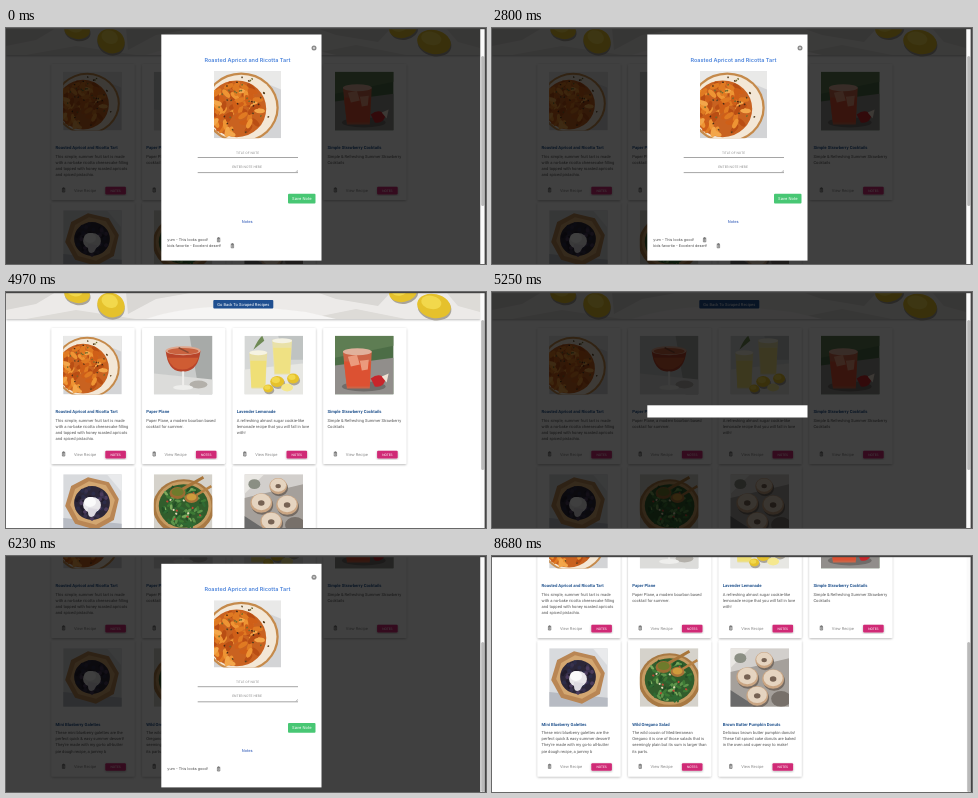
An HTML page that plays this animation: 480 by 236 pixels, repeating every 8750 ms.

```html
<!DOCTYPE html>
<html lang="en">
<head>
<meta charset="utf-8">
<title>Saved recipes</title>
<style>
  html, body { margin: 0; width: 100%; height: 100%; overflow: hidden; background: #fff; }
  #stage { display: block; width: 480px; height: 236px; }
  text { font-family: Roboto, sans-serif; text-rendering: geometricPrecision; }
  #modal text { font-family: Inter, sans-serif; }
</style>
</head>
<body>
<svg id="stage" viewBox="0 0 480 236"></svg>
<script>
const LOOP = 8750, SCROLL = 90;
const stage = document.getElementById('stage');

let seed = 11;
const rnd = () => (seed = seed * 16807 % 2147483647) / 2147483647;
const pick = list => list[Math.floor(rnd() * list.length)];
const repeat = (n, make) => Array.from({ length: n }, (_, i) => make(i)).join('');

const rect = (x, y, w, h, fill, more = '') =>
  `<rect x="${x}" y="${y}" width="${w}" height="${h}" fill="${fill}" ${more}/>`;
const oval = (x, y, rx, ry, fill, more = '') =>
  `<ellipse cx="${x}" cy="${y}" rx="${rx}" ry="${ry}" fill="${fill}" ${more}/>`;
const path = (d, fill, more = '') => `<path d="${d}" fill="${fill}" ${more}/>`;
const line = (d, color, width) => path(d, 'none', `stroke="${color}" stroke-width="${width}"`);
const label = (x, y, size, fill, str, more = '') =>
  `<text x="${x}" y="${y}" font-size="${size}" fill="${fill}" ${more}>${str.replace(/&/g, '&amp;')}</text>`;
const mid = 'text-anchor="middle"';
const turn = (a, x, y) => `transform="rotate(${a} ${x} ${y})"`;
const trash = (x, y, color) =>
  path(`M${x - 1.6} ${y - 1.7}h3.2M${x - .6} ${y - 2.2}h1.2M${x - 1.2} ${y - 1.2}v3.2h2.4v-3.2zM${x} ${y - .8}v2.4`,
    'none', `stroke="${color}" stroke-width=".65"`);

// Scatter small ovals inside a disc
const scatter = (n, cx, cy, r, rx, ry, colors) => repeat(n, () => {
  const a = rnd() * 6.283, d = Math.sqrt(rnd()) * r;
  const x = cx + Math.cos(a) * d, y = cy + Math.sin(a) * d;
  return oval(x, y, rx, ry, pick(colors), turn(rnd() * 180, x, y));
});
const lemon = (x, y, rx, ry, a = 0) =>
  oval(x + 1, y + 2, rx, ry, '#a9a49a', turn(a, x, y)) +
  oval(x, y, rx, ry, '#e5c12c', turn(a, x, y)) +
  oval(x - rx * .2, y - ry * .25, rx * .6, ry * .55, '#f2d84c', turn(a, x, y));
const donut = (x, y, r) =>
  oval(x + 1, y + 2, r, r * .9, '#756b63') + oval(x, y, r, r * .9, '#c9a583') +
  oval(x, y - 1, r * .88, r * .75, '#e5d4c0') + oval(x, y, r * .3, r * .25, '#766253');

const art = [
  // tart
  rect(0, 0, 59, 59, '#d3d4d6') + path('M0 0H59V16L30 4L0 12Z', '#e9e9e8') +
  oval(24, 32, 33, 31, '#c58a4b') + oval(24, 32, 31, 29, '#f3e7d6') + oval(20, 33, 26, 25, '#c96220') +
  scatter(75, 20, 33, 23, 4.6, 2.1, ['#e07a22', '#ee9433', '#cf5f18', '#f3a64a', '#b94e14']) +
  scatter(34, 27, 30, 25, .9, .7, ['#59401f', '#6f6a2c', '#4a2a14']),
  // coupe cocktail
  rect(0, 0, 59, 59, '#c9cbca') + path('M36 0H59V59H46Z', '#a7aaa8') + path('M0 38L59 44V59H0Z', '#dcdcda') +
  oval(45, 49, 9, 4, '#b3b0aa') +
  path('M12 15Q14 35 27 36H32Q45 34 47 15Z', '#b8442a') + path('M14 22Q18 34 29 34Q41 33 45 22Z', '#cf5c33') +
  oval(29.5, 15, 17.5, 4.5, '#dfa78e') + oval(29.5, 15.5, 15.5, 3.2, '#c9623f') +
  line('M29.5 36V51', '#efeeec', 2) + oval(29.5, 52, 10, 2.5, '#eeeeec') + line('M25 12L35 17', '#8a4b33', 1.5),
  // lemonade
  rect(0, 0, 59, 59, '#d5d7d6') + path('M0 34L59 28V59H0Z', '#e7e7e3') + path('M34 0H59V24H40Z', '#bfc3c2') +
  path('M28 4H48L46 39H30Z', '#e9e1a8') + path('M29 12H47L46 38H31Z', '#efe183') + oval(38, 5, 10, 2.5, '#f4f2e4') +
  path('M5 17H23L21 53H7Z', '#e8dfa4') + path('M6 25H22L21 52H7Z', '#efdf76') + oval(14, 17, 9, 2.5, '#f6f3e2') +
  lemon(33, 46, 7, 5.5) + lemon(49, 43, 6, 5) + lemon(24, 53, 5, 4) + oval(43, 52, 6, 4, '#f5e88f') +
  path('M9 14Q14 3 18 0L20 5Z', '#6f8a55'),
  // strawberry cocktail
  rect(0, 0, 59, 59, '#4c6d46') + path('M0 0H59V10L0 22Z', '#5e7d53') + path('M0 30L59 22V59H0Z', '#918e8b') +
  oval(29, 51, 22, 5, '#6f6c69') + path('M8 16H37L35 53H12Z', '#cd6446') + path('M9 26H36L35 51H12Z', '#dc5132') +
  oval(22.5, 16, 14.5, 3.5, '#e0b19c') + path('M13 21L22 19L25 29L16 31ZM25 25L34 24L33 34L27 35Z', '#eb9a7d') +
  path('M36 43Q45 36 51 44Q48 53 40 51Z', '#c7262b') + path('M47 41L54 38L52 47Z', '#efe2d4'),
  // galette
  rect(0, 0, 59, 59, '#d8dadd') + path('M0 44L59 50V59H0Z', '#b7bbc3') + path('M44 0H59V18Z', '#e9eaec') +
  path('M8 12L25 3L46 8L56 25L51 46L33 56L12 50L2 32Z', '#b98654') +
  path('M12 15L26 7L43 11L52 26L47 43L33 51L15 46L7 31Z', '#d3a771') +
  oval(29, 29, 18, 17, '#2b2638') + scatter(45, 29, 29, 16, 2, 1.9, ['#39324d', '#211c2c', '#4b3c5d', '#2c2c48']) +
  oval(29, 31, 9, 8, '#e8e6e9') + oval(27, 28, 6, 5, '#fafafa') + path('M25 34Q24 46 31 42L35 35Z', '#dcd9e0'),
  // salad
  rect(0, 0, 59, 59, '#d5d2cb') + oval(30, 33, 31, 28, '#a87943') + oval(30, 32, 28, 25, '#c69b62') +
  oval(30, 32, 25, 22, '#315d2c') +
  scatter(85, 30, 32, 22, 3, 1.4, ['#3d7a35', '#235026', '#5c944a', '#2f6a33', '#7aa95c']) +
  scatter(14, 30, 34, 19, 1.2, 1, ['#c14735', '#e3d9b5']) +
  oval(24, 19, 8, 6, '#9a6b32') + oval(24, 18, 6, 4, '#6e7b2c') + line('M29 15L50 3', '#a9763b', 3) +
  oval(38, 24, 7, 5, '#a87337') + oval(38, 23, 5, 3.4, '#cf9b3c') + line('M43 21L58 12', '#b68143', 2.5),
  // donuts
  rect(0, 0, 59, 59, '#d2cfcc') + path('M0 24L59 10V59H0Z', '#a5a09b') + path('M0 42L26 59H0Z', '#6a6a6a') +
  path('M0 0H20L0 20Z', '#e9e7e3') + oval(10, 10, 6, 5, '#8b8f84') + oval(51, 51, 10, 8, '#77706a') +
  donut(34, 12, 9) + donut(17, 29, 11) + donut(43, 31, 11) + donut(27, 48, 11)
];

const recipes = [
  ['Roasted Apricot and Ricotta Tart', 'This simple, summer fruit tart is made', 'with a no-bake ricotta cheesecake filling',
    'and topped with honey roasted apricots', 'and spiced pistachio.'],
  ['Paper Plane', 'Paper Plane, a modern bourbon based', 'cocktail for summer.'],
  ['Lavender Lemonade', 'A refreshing almost sugar cookie-like', 'lemonade recipe that you will fall in love', 'with!'],
  ['Simple Strawberry Cocktails', 'Simple & Refreshing Summer Strawberry', 'Cocktails'],
  ['Mini Blueberry Galettes', 'These mini blueberry galettes are the', 'perfect quick & easy summer dessert!',
    'They’re made with my go-to all-butter', 'pie dough recipe, a jammy b'],
  ['Wild Oregano Salad', 'The wild cousin of Mediterranean', 'Oregano it is one of those salads that is',
    'seemingly plain but its sum is larger than', 'its parts.'],
  ['Brown Butter Pumpkin Donuts', 'Delicious brown butter pumpkin donuts!', 'These fall spiced cake donuts are baked',
    'in the oven and super easy to make!']
];

const photo = (i, x, y, size) =>
  `<svg x="${x}" y="${y}" width="${size}" height="${size}" viewBox="0 0 59 59">${art[i]}</svg>`;

function card([title, ...lines], i) {
  const x = i % 4 * 90.6, y = i < 4 ? 0 : 138.4;
  return `<g transform="translate(${x} ${y})">` +
    rect(45.5, 36, 83, 136, '#fff', 'rx="1" filter="url(#lift)"') +
    photo(i, 57.2, 43.8, 58.6) +
    label(49.6, 121.2, 4.25, '#24558f', title, 'font-weight="700"') +
    lines.map((s, n) => label(49.6, 129.8 + n * 6.15, 4.1, '#555', s)).join('') +
    trash(57.6, 162, '#555') +
    label(68, 163.5, 4.1, '#8a8a8a', 'View Recipe') +
    rect(99.3, 158.8, 20.6, 7.6, '#d02a76', 'rx="1" filter="url(#lift)"') +
    label(109.6, 163.8, 3.3, '#fff', 'NOTES', mid) + '</g>';
}

const banner =
  rect(0, -20, 474.5, 47, '#eceae8', 'filter="url(#lift)"') +
  path('M0 0H50L30 12L0 18ZM120 0H190L150 7L122 22ZM310 0H385L372 14L330 7Z', '#d9d7d4') +
  path('M20 27L70 18L130 27ZM300 27L350 17L400 27ZM440 0H474V20L452 14Z', '#dddbd7') +
  path('M140 27Q200 6 300 20L330 27Z', '#f6f5f4') +
  lemon(71, 2, 13, 9, 10) + lemon(105, 13, 14, 12, 25) +
  lemon(397, 0, 14, 10, -10) + lemon(428, 14, 17, 12, 12) +
  rect(207.3, 8, 60, 8.6, '#1f4f90', 'rx="1"') +
  label(237.3, 13.8, 4.1, '#fff', 'Go Back To Scraped Recipes', mid);

const note = (y, str, binX, id = '') =>
  `<g ${id}>` + label(161.3, y + 1.4, 3.75, '#4a4a4a', str) + trash(binX, y, '#555') + '</g>';

const form =
  oval(308, 20, 2.5, 2.5, '#8c8c8c') + line('M307.1 19.1l1.8 1.8m0-1.8l-1.8 1.8', '#fff', .6) +
  label(241.4, 33.6, 5.5, '#4f86dc', recipes[0][0], mid + ' font-weight="600"') +
  photo(0, 208, 43.3, 67) +
  label(241.5, 125.7, 3.15, '#858585', 'TITLE OF NOTE', mid) +
  label(241, 139.9, 3.25, '#858585', 'ENTER NOTE HERE', mid) +
  line('M191.7 129.5H292M191.7 144.6H292', '#8f8f8f', .8) +
  line('M289.8 144L291.8 142M291 144L291.8 143.2', '#777', .4) +
  rect(282, 165.8, 27.5, 9.8, '#48c774', 'rx="1"') +
  label(295.8, 172.2, 4, '#fff', 'Save Note', mid) +
  label(241.2, 194.8, 3.9, '#3f66bd', 'Notes', mid + ' font-weight="500"') +
  note(211.8, 'yum - This looks good!', 212.6) +
  note(217.8, 'kids favorite - Excelent desert!', 226.4, 'id="second"');

stage.innerHTML =
  `<defs><filter id="lift" x="-10%" y="-10%" width="120%" height="130%">
    <feDropShadow dx="0" dy=".8" stdDeviation=".8" flood-opacity=".3"/></filter></defs>` +
  rect(0, 0, 480, 236, '#fff') +
  `<g id="page">${recipes.map(card).join('')}${banner}</g>` +
  `<g id="modal">${rect(0, 0, 474.5, 236, '#000', 'opacity=".75"')}${rect(155.3, 0, 160.2, 0, '#fff', 'id="panel"')}
    <g id="form">${form}</g></g>` +
  rect(474.5, 0, 4, 236, '#fafafa') + rect(475.2, 28, 3, 150, '#b9b9b9', 'rx="1.5" id="thumb"') +
  rect(478.6, 0, 1.4, 236, '#444') + rect(0, 0, 480, 1.2, '#444');

const [page, modal, panel, formBox, second, thumb] =
  ['page', 'modal', 'panel', 'form', 'second', 'thumb'].map(id => document.getElementById(id));
const show = (el, on) => el.setAttribute('display', on ? 'inline' : 'none');
const shift = (el, y) => el.setAttribute('transform', `translate(0 ${y})`);
const ease = k => k * k * (3 - 2 * k);

function draw(t) {
  const scroll = SCROLL * ease(Math.min(1, Math.max(0, (t - 5740) / 420)));
  const twoNotes = t < 3850, empty = t < 5320 && !twoNotes;
  const [top, bottom] = twoNotes ? [6.5, 232.6] : empty ? [113.3, 125.5] : [7.8, 231.4];
  shift(page, -scroll);
  shift(thumb, scroll * .644);
  show(modal, twoNotes || t >= 5250 && t < 7840);
  panel.setAttribute('y', top);
  panel.setAttribute('height', bottom - top);
  show(formBox, !empty);
  show(second, twoNotes);
  shift(formBox, twoNotes ? 0 : 1.2);
}

const start = performance.now();
function tick() {
  draw((performance.now() - start) % LOOP);
  requestAnimationFrame(tick);
}
tick();
</script>
</body>
</html>
```
